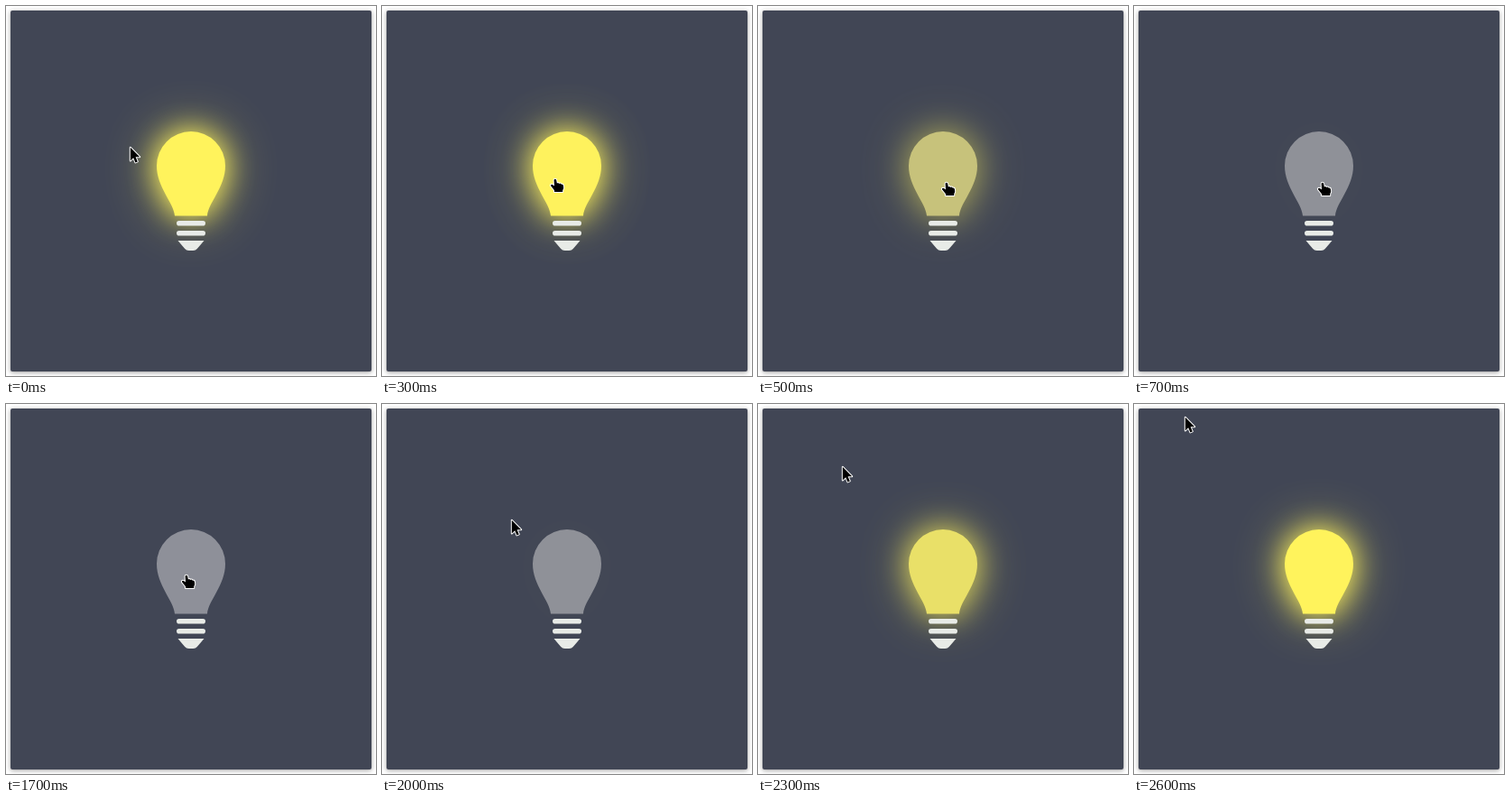
An HTML page for the animation above (2.7 s loop, 410 px wide and 410 px high).

```html
<!DOCTYPE html>
<html lang="en">
<head>
<meta charset="utf-8">
<title>Light bulb</title>
<style>
html, body { margin: 0; width: 100%; height: 100%; overflow: hidden; background: #fff; }
svg { display: block; width: 100vw; height: 100vh; }
.card { filter: drop-shadow(0 1px 2.5px rgba(0, 0, 0, .4)); }
.cursor { fill: #000; stroke: #fff; stroke-width: 2; stroke-linejoin: round; paint-order: stroke; }
</style>
</head>
<body>
<svg viewBox="0 0 410 410">
  <defs>
    <path id="shape" d="M187 232.5C186 218 167 201 167 177A38 38 0 0 1 243 177C243 201 224 218 223 232.5Z"/>
    <filter id="near" filterUnits="userSpaceOnUse" x="60" y="40" width="290" height="290" color-interpolation-filters="sRGB">
      <feGaussianBlur stdDeviation="16"/>
    </filter>
    <filter id="far" filterUnits="userSpaceOnUse" x="40" y="20" width="330" height="340" color-interpolation-filters="sRGB">
      <feGaussianBlur stdDeviation="30"/>
    </filter>
  </defs>
  <rect class="card" x="5" y="5" width="400" height="400" rx="2" fill="#414655"/>
  <g id="glow" fill="#fff35c">
    <use href="#shape" filter="url(#far)" opacity=".6"/>
    <use href="#shape" filter="url(#near)"/>
  </g>
  <use id="bulb" href="#shape"/>
  <g fill="#e8ebe7">
    <rect x="189" y="238" width="32" height="5.6" rx="2.8"/>
    <rect x="189" y="249" width="32" height="5.6" rx="2.8"/>
    <path d="M190.5 260H219.5L211.8 269Q210.2 271 207.5 271H202.5Q199.8 271 198.2 269Z"/>
  </g>
  <g id="pointer">
    <path id="arrow" class="cursor" d="M.8 1.8V16.4L4.2 13.2 6.4 18.4 8.8 17.4 6.6 12.3H11.2Z"/>
    <path id="hand" class="cursor" d="M-1.4 2Q-1.3 .8 -.2 .8 1 .8 1.2 2L1.9 5.4Q3.4 4.6 4.2 5.9 5.7 5.1 6.5 6.5 8.6 6 9 8.2L9.2 11 8.2 13.2V15H-1V13.2L-3.4 10.2-5 8.3Q-5.4 7 -4 6.8 -2.8 6.8 -1 8.6Z"/>
  </g>
</svg>
<script>
const LOOP = 2700, STEP = 100;
const get = id => document.getElementById(id);
const glow = get('glow'), bulb = get('bulb'), pointer = get('pointer');
const arrow = get('arrow'), hand = get('hand');

// time, x, y of the pointer's hot spot
const track = [
  [0, 137, 155], [300, 192, 191], [400, 203, 195], [500, 209, 195],
  [1600, 209, 195], [1700, 200, 189], [2200, 105, 86], [2600, 56, 13], [LOOP, 56, 13]
];

function place(t) {
  const i = track.findIndex(k => k[0] > t);
  const a = track[i - 1], b = track[i];
  const p = (t - a[0]) / (b[0] - a[0]);
  return [1, 2].map(n => Math.round(a[n] + (b[n] - a[n]) * p));
}

function smooth(from, to, t) {
  const p = Math.min(1, Math.max(0, (t - from) / (to - from)));
  return p * p * (3 - 2 * p);
}

const mix = (a, b, p) => a.map((v, i) => Math.round(v + (b[i] - v) * p));

function draw(time) {
  let t = Math.floor((time % LOOP) / STEP) * STEP;
  if (t > 700 && t < 1700) t = 700;
  const level = 1 - smooth(270, 730, t) + smooth(1970, 2430, t);
  const over = t >= 200 && t < 1900;
  glow.setAttribute('opacity', level);
  bulb.setAttribute('fill', `rgb(${mix([142, 144, 153], [255, 243, 92], level)})`);
  pointer.setAttribute('transform', `translate(${place(t > 699 && t < 1700 ? 500 : t)})`);
  arrow.setAttribute('display', over ? 'none' : 'inline');
  hand.setAttribute('display', over ? 'inline' : 'none');
}

const start = performance.now();
function tick() {
  draw(performance.now() - start);
  requestAnimationFrame(tick);
}
tick();
</script>
</body>
</html>
```
